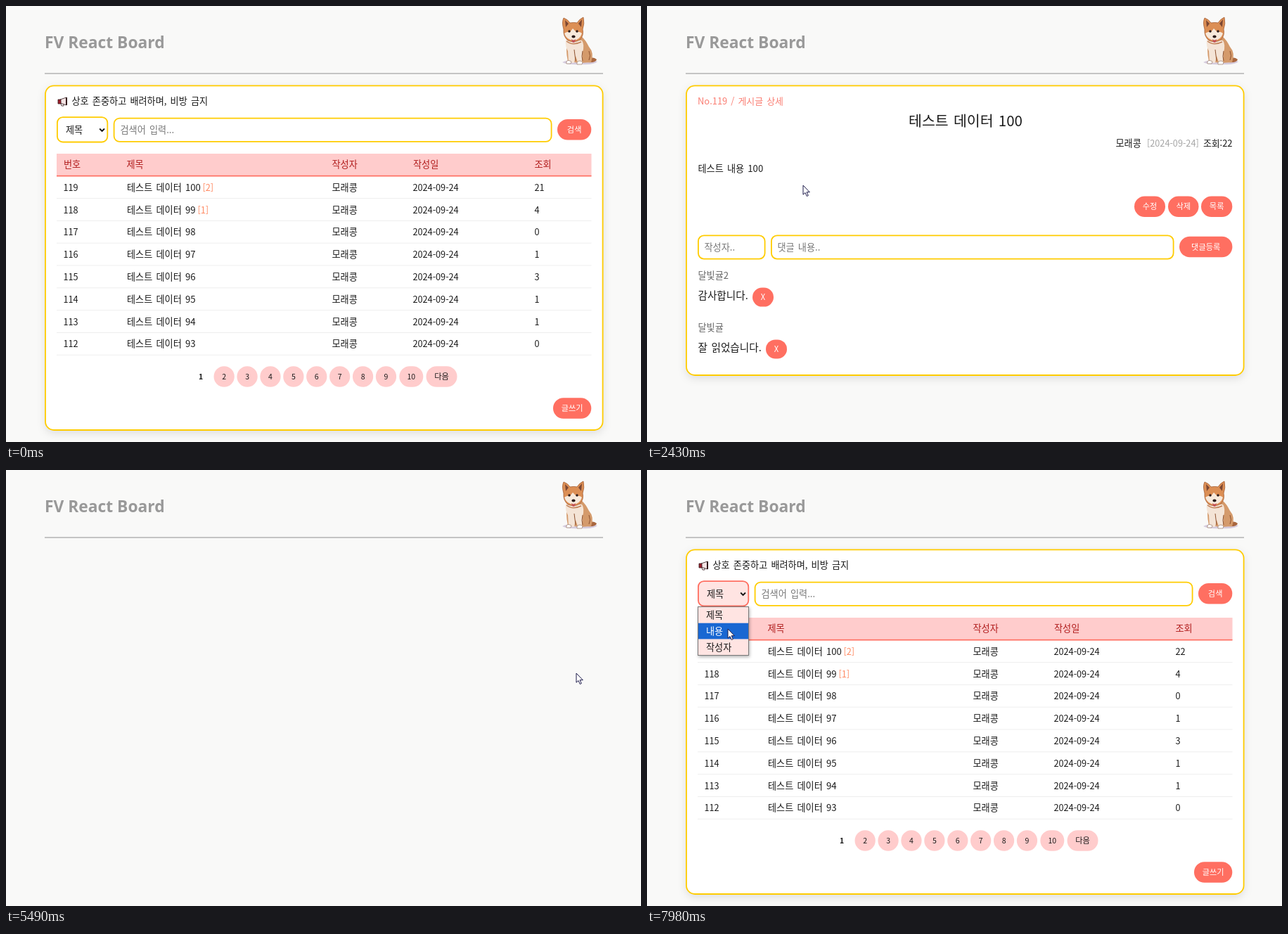
Animation, 903 px wide and 620 px high, one loop 8000 ms. Source, as an HTML page:

```html
<!DOCTYPE html>
<html lang="ko">
<meta charset="utf-8">
<title>React Board</title>
<style>
html, body { margin: 0; width: 100%; height: 100%; overflow: hidden; background: #f9f9f8 }
svg { display: block }
text { font-family: "Noto Sans CJK KR", "Noto Sans", sans-serif; word-spacing: 1.5px; white-space: pre }
.card { fill: #fff; stroke: #fc0; stroke-width: 1.8; filter: drop-shadow(0 4px 6px rgba(0,0,0,.1)) }
.field { fill: #fff; stroke: #fc0; stroke-width: 1.8 }
</style>
<svg id="stage" width="903" height="620" viewBox="0 0 903 620">
  <text x="55" y="60" font-size="22.8" font-weight="700" fill="#999" style="font-family:'Open Sans',sans-serif;word-spacing:0">FV React Board</text>
  <path d="M55 96H849" stroke="#b3b3b3" stroke-width="1.4"/>
  <g id="dog">
    <path d="M791 80q8-4 24-3 18-1 26 2-4 5-24 4-18 1-26-3" fill="#d5cbdc"/>
    <path d="M827 76q8-5 13 0-1 5-13 4z" fill="#a9673f"/>
    <path d="M799 45q-4 15 0 34l18 2 15-1q5-13-3-22-5-10-10-14z" fill="#d49a6b"/>
    <path d="M796 48q-1 10 3 16l1 16 8 1 2-10 3 9h6l1-14q3-11-1-17z" fill="#f4e4d6"/>
    <path d="M797 79q2-3 7 0l-1 3h-6zM812 80q4-4 8 0l-1 3h-7z" fill="#fff" stroke="#9a7a68" stroke-width=".7"/>
    <path d="M808 62l2 16M820 64q-2 8 0 14M829 64q3 7 0 13" fill="none" stroke="#8d5230"/>
    <path d="M797 50q9 7 21 1" fill="none" stroke="#c08058" stroke-width="1.5"/>
    <path d="M793 33q-3-10 0-16 6 2 9 7 6-1 10 0 4-6 9-8 2 9-1 17 2 9-4 15-8 5-17 1-7-6-6-16z" fill="#dc8f55" stroke="#a45f35" stroke-width=".8"/>
    <path d="M795 20l5 5-4 5zM819 19l-5 6 4 5z" fill="#7c4733"/>
    <path d="M794 39q4-3 8-2l4-5 5 5q5-1 8 2-3 9-12 10-10-1-13-10z" fill="#f7e9db"/>
    <path d="M804 47q3 3 6 0l-1 4q-2 2-4 0z" fill="#c45358"/>
    <g fill="#2b1c1b"><circle cx="801" cy="36" r="1.7"/><circle cx="812" cy="36" r="1.7"/><ellipse cx="807" cy="43.5" rx="2.6" ry="2"/></g>
  </g>
  <g id="list"></g>
  <g id="detail"></g>
  <path id="cursor" stroke="#1c1a4a" fill="#fff" stroke-linejoin="round"/>
</svg>
<script>
const LOOP = 8000, STEP = 70;
const RED = '#ff6f61', PINK = '#ffcccc', PALE = '#ffe4e2', INK = '#1a1a1a', GRAY = '#777';
const ROW_TOP = 242, ROW_H = 31.82;
const $ = id => document.getElementById(id);

const text = (x, y, s, {size = 13.15, fill = INK, anchor = 'start', weight = 350, id = ''} = {}) =>
  `<text ${id && `id="${id}"`} x="${x}" y="${y}" font-size="${size}" fill="${fill}" text-anchor="${anchor}" font-weight="${weight}">${s}</text>`;
const num = (x, y, s, o) => text(x, y, s, {size: 12.7, ...o});
const rect = (x, y, w, h, attrs = '') => `<rect x="${x}" y="${y}" width="${w}" height="${h}" ${attrs}/>`;
const field = (x, y, w, h, id = '') => rect(x + .9, y + .9, w - 1.8, h - 1.8, `rx="8" class="field" id="${id}"`);
const card = (bottom, id = '') => rect(56, 113.3, 792.6, bottom - 114.3, `rx="12" class="card" id="${id}"`);
const pill = (x, y, w, label, {h = 29.5, bg = RED, fill = '#fff', size = 11.2, id = ''} = {}) =>
  rect(x, y, w, h, `rx="${h / 2}" fill="${bg}" id="${id}"`) +
  text(x + w / 2, y + h / 2 + 4.1, label, {size, fill, anchor: 'middle'});

function listView() {
  const views = [21, 4, 0, 1, 3, 1, 1, 0], head = {fill: '#b01c1c'};
  let s = card(604) +
    `<g stroke="#33191b" stroke-width=".8"><path d="M77 133l9-3v11l-9-3z" fill="#f3e4e4"/>
     <path d="M74 133h4v6h-4z" fill="#9c1f2b"/><path d="M78 139l1 3h3v-2" fill="none"/><path d="M86 130v11" stroke-width="2"/></g>` +
    text(93.5, 140, '상호 존중하고 배려하며, 비방 금지') +
    field(72, 157.2, 73.2, 37.2, 'select') + text(85, 181, '제목') +
    '<path d="M133.2 174.5l3.4 3.4 3.4-3.4" fill="none" stroke="#111" stroke-width="1.8"/>' +
    field(152.7, 158.7, 623.8, 35.1) + text(162.5, 181, '검색어 입력...', {fill: GRAY}) +
    pill(784, 161, 48.3, '검색') +
    rect(72, 210, 760.5, 32, `fill="${PINK}"`) +
    rect(72, ROW_TOP, 760.5, ROW_H, `fill="${PALE}" id="hover"`) +
    rect(72, 240.8, 760.5, 1.7, `fill="${RED}"`);
  [[82, '번호'], [171.5, '제목'], [463.5, '작성자'], [579, '작성일'], [751.5, '조회']]
    .forEach(([x, label]) => s += text(x, 230, label, head));
  views.forEach((v, i) => {
    const y = 262.7 + i * ROW_H, replies = 2 - i;
    s += num(81.5, y, 119 - i) + text(172, y, `테스트 데이터 ${100 - i}`) +
      (replies > 0 ? num(i ? 272.5 : 279.5, y, `[${replies}]`, {fill: '#ff8a63'}) : '') +
      text(463.5, y, '모래콩') + num(578.5, y, '2024-09-24') +
      num(751.5, y, v, {id: i ? '' : 'views'}) +
      rect(72, ROW_TOP + (i + 1) * ROW_H - .8, 760.5, 1, 'fill="#eee"');
  });
  const page = {bg: PINK, fill: INK, size: 10.5};
  s += text(277, 531, 1, {size: 10.5, weight: 700, anchor: 'middle'});
  for (let n = 2; n < 10; n++) s += pill(295.5 + (n - 2) * 32.9, 512.3, 29.3, n, page);
  s += pill(559.3, 512.3, 34, 10, page) + pill(597.5, 512.3, 44, '다음', {...page, size: 11.2}) +
    pill(778, 557.2, 54.3, '글쓰기');
  s += '<g id="menu">' +
    rect(72.5, 194.5, 72, 69, `fill="${PALE}" stroke="#777" style="filter:drop-shadow(1px 2px 2px rgba(0,0,0,.3))"`) +
    rect(73, 195, 71, 22.7, 'fill="#1967d2" id="choice"');
  ['제목', '내용', '작성자'].forEach((label, i) => s += text(84, 211.2 + i * 22.7, label, {id: 'item' + i}));
  return s + '</g>';
}

function detailView() {
  const comment = (y, name, body, x) =>
    text(72.5, y, name, {fill: '#666', weight: 500}) + text(72.5, y + 29, body, {size: 14.6}) +
    pill(x, y + 12.6, 30, 'X', {h: 27});
  return card(526, 'detailCard') +
    text(72, 140, 'No.119 / 게시글 상세', {size: 12.9, fill: '#fa7d72'}) +
    text(453, 171, '테스트 데이터 100', {size: 20.5, anchor: 'middle'}) +
    text(666.5, 199.5, '모래콩') + num(711, 199.5, '[2024-09-24]', {fill: '#a5a5a5'}) +
    text(832.5, 199.5, '조회:22', {size: 12.9, anchor: 'end'}) +
    text(72.5, 236.2, '테스트 내용 100') +
    pill(693, 270.5, 44, '수정') + pill(741, 270.5, 43.5, '삭제') +
    pill(788, 270.5, 44.3, '목록', {id: 'back'}) +
    field(72, 325.5, 96.5, 35) + text(81.5, 347.7, '작성자..', {fill: GRAY}) +
    field(176, 325.5, 573.5, 35) + text(185.5, 347.7, '댓글 내용..', {fill: GRAY}) +
    pill(757, 327.8, 75.4, '댓글등록') +
    '<g id="comments">' + comment(388, '달빛귤2', '감사합니다.', 150) +
    comment(461.8, '달빛귤', '잘 읽었습니다.', 169) + '</g>';
}

$('list').innerHTML = listView();
$('detail').innerHTML = detailView();

const ARROW = 'M0 0v13.2l3-2.7 2.3 5 2-1-2.2-4.8h4.2z';
const HAND = 'M0 0c1.2 0 1.6.9 1.6 2v5l5 1.2c1 .3 1.5 1 1.4 2l-.8 4.5-.9 2v2H-1v-2l-3.6-5c-1-1.5.6-2.5 1.8-1.5l1.2 1.2V2c0-1.1.4-2 1.6-2zM1.6 7v4M4 8v3M6.2 8.4v3';
// Cursor sweeps: start time, steps, start, bend and end points
const SWEEPS = [
  [190, 13, [793, 563], [470, 0], [222, 255]],
  [3640, 12, [222, 255], [520, 330], [811, 289]],
  [6080, 8, [811, 289], [-156, 190], [119, 174]],
  [7630, 5, [119, 174], [117, 200], [115, 226]]
];
const clamp = v => Math.max(0, Math.min(1, v));
const show = (id, on) => $(id).style.display = on ? '' : 'none';
const set = (id, attrs) => { for (const k in attrs) $(id).setAttribute(k, attrs[k]); };

function cursorAt(t) {
  const [start, steps, a, b, c] = SWEEPS.filter(s => s[0] <= t).pop() || SWEEPS[0];
  const k = clamp(Math.floor((t - start) / STEP) / steps), u = k * k * (3 - 2 * k);
  return [0, 1].map(i => a[i] * (1 - u) ** 2 + 2 * b[i] * u * (1 - u) + c[i] * u * u);
}

function render(t) {
  const [x, y] = cursorAt(t), visible = t >= 190;
  const inside = (l, top, r, bottom) => visible && x >= l && x <= r && y >= top && y <= bottom;
  const onList = t < 1890 || t >= 5820, onDetail = t >= 2160 && t < 5420;
  const open = t >= 6840, second = y > 217.7;
  show('list', onList);
  show('detail', onDetail);

  const row = Math.floor((y - ROW_TOP) / ROW_H);
  const overRow = inside(72, ROW_TOP, 832, ROW_TOP + 8 * ROW_H - .1);
  show('hover', overRow && !open);
  if (overRow) set('hover', {y: ROW_TOP + row * ROW_H});
  $('views').textContent = t < 1890 ? 21 : 22;

  const overSelect = inside(72, 157, 145, 194);
  $('select').style.fill = open || overSelect ? PALE : '#fff';
  $('select').style.stroke = open ? RED : '#fc0';
  show('menu', open);
  set('choice', {y: second ? 217.7 : 195});
  set('item0', {fill: second ? INK : '#fff'});
  set('item1', {fill: second ? '#fff' : INK});

  show('comments', t >= 2430);
  set('detailCard', {height: t >= 2430 ? 411.7 : 263.7});
  const h = clamp((t - 4410) / 280), mix = (a, b) => Math.round(a + (b - a) * h);
  set('back', {
    x: 788 - h, y: 270.5 - .8 * h, width: 44.3 + 2 * h, height: 29.5 + 1.6 * h, rx: 14.75 + .8 * h,
    fill: `rgb(${mix(255, 204)},${mix(111, 0)},${mix(97, 0)})`
  });

  const link = onList
    ? overRow && x > 171 && x < 276 || inside(778, 557, 832, 587) || overSelect && t < 7240
    : onDetail && inside(693, 270, 833, 300);
  show('cursor', visible);
  set('cursor', {
    d: link ? HAND : ARROW, transform: `translate(${x} ${y})`,
    'stroke-width': link ? .9 : 1
  });
}

function frame() {
  render(performance.now() % LOOP);
  requestAnimationFrame(frame);
}
frame();
</script>
</html>
```
